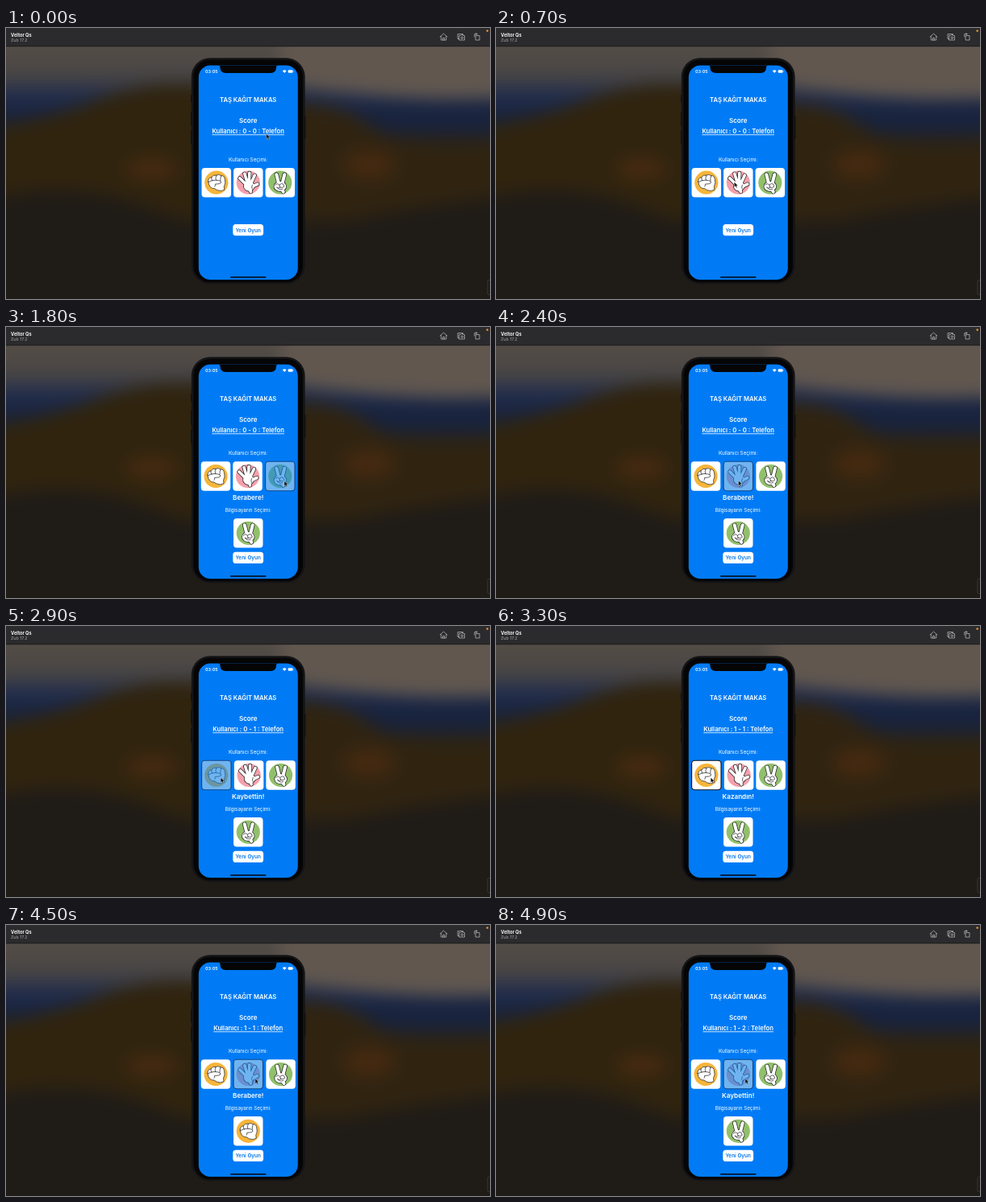
An HTML page that plays this animation: 600 by 337 pixels, repeating every 5 s.

```html
<!DOCTYPE html>
<html lang="tr">
<head>
<meta charset="utf-8">
<title>Taş Kağıt Makas</title>
<style>
html, body { margin: 0; width: 100%; height: 100%; overflow: hidden; background: #1c1a1a; }
svg { display: block; width: 100vw; height: 100vh; }
text { font-family: Inter, Roboto, sans-serif; }
.mid { text-anchor: middle; fill: #fff; }
.bold { font-weight: 600; }
.icon { fill: none; stroke: #b9b8ba; stroke-width: .75; stroke-linejoin: round; stroke-linecap: round; }
.ink { fill: none; stroke: #1d1d1f; stroke-width: .7; stroke-linecap: round; stroke-linejoin: round; }
</style>
</head>
<body>
<svg viewBox="0 0 600 337" preserveAspectRatio="none">
  <defs>
    <linearGradient id="sky" gradientUnits="userSpaceOnUse" x1="0" y1="0" x2="0" y2="337">
      <stop offset=".05" stop-color="#544d47"/>
      <stop offset=".17" stop-color="#4a4644"/>
      <stop offset=".26" stop-color="#1c2a4c"/>
      <stop offset=".34" stop-color="#1a2236"/>
      <stop offset=".45" stop-color="#2a2115"/>
      <stop offset=".7" stop-color="#221d17"/>
      <stop offset="1" stop-color="#1b1918"/>
    </linearGradient>
    <filter id="soft" filterUnits="userSpaceOnUse" x="-60" y="-60" width="720" height="460" color-interpolation-filters="sRGB">
      <feGaussianBlur stdDeviation="10"/>
    </filter>
    <clipPath id="glass"><rect x="238.8" y="46.5" width="123" height="266.6" rx="14.5"/></clipPath>

    <g id="rock">
      <circle r="14.6" fill="#f6b53a"/>
      <path class="ink" style="fill:#fff" d="M-10-1Q-10.500-6-6-6.500Q-4-10 0-9Q3-11 6-8.500Q10-9 10.500-4Q12 1 9.500 5L10 9Q6 11.500 1 9.500L-2 7.500Q-9 8-10-1Z"/>
      <path class="ink" d="M-6-6.500Q-6.500-4-5-2M0-9Q-1.500-6-.5-3M6-8.500Q4.500-5 5-2.500M-9-1Q-5-3.500-1-3Q3-3 5.500-1.500Q6.500 1 3.500 1.500L-1.500 2Q-1 4-2 5"/>
    </g>
    <g id="paper">
      <circle r="14.6" fill="#f4a0ac"/>
      <g fill="none" stroke="#1d1d1f" stroke-width="5" stroke-linecap="round">
        <path d="M0 5L-10.500-5.500M0 4L-4.500-11M1 4L1.500-12M2 4L8-9M3 6L11.500 2M2 6L3 11.500"/>
        <ellipse cx="1" cy="4.500" rx="5.500" ry="5" stroke-width="3.400"/>
        <g stroke="#fff" stroke-width="3.600">
          <path d="M0 5L-10.500-5.500M0 4L-4.500-11M1 4L1.500-12M2 4L8-9M3 6L11.500 2M2 6L3 11.500"/>
          <ellipse cx="1" cy="4.500" rx="5.500" ry="5" stroke-width="2" fill="#fff"/>
        </g>
      </g>
      <path class="ink" d="M5 3Q3.500 6 5 8"/>
    </g>
    <g id="scissors">
      <circle r="14.600" fill="#91c06b"/>
      <g fill="none" stroke="#1d1d1f" stroke-width="5.400" stroke-linecap="round">
        <path d="M-1 4L-4.500-10M2 4L5.500-10M1 6L4 11.500"/>
        <ellipse cx="0" cy="4.800" rx="6.500" ry="5" stroke-width="3.400"/>
        <g stroke="#fff" stroke-width="4">
          <path d="M-1 4L-4.500-10M2 4L5.500-10M1 6L4 11.500"/>
          <ellipse cx="0" cy="4.800" rx="6.500" ry="5" stroke-width="2" fill="#fff"/>
        </g>
      </g>
      <path class="ink" d="M-6 3Q-3 0-1 3L0 6Q-2 8-4 6M-1 3Q2 0 4 2L5 5Q3 7 0 6M-4 6Q-1 10 3 8"/>
    </g>
  </defs>

  <g filter="url(#soft)">
    <rect x="-60" y="-60" width="720" height="460" fill="url(#sky)"/>
    <path d="M340-20H660V84Q560 92 470 85T340 68Z" fill="#61574f"/>
    <path d="M440 98Q540 104 660 92V128H470Z" fill="#18233e"/>
    <path d="M-60 130Q40 118 110 90T250 72V240H-60Z" fill="#30240f"/>
    <path d="M350 95Q410 88 450 122T660 135V240H350Z" fill="#302411"/>
    <ellipse cx="180" cy="175" rx="32" ry="15" fill="#452910"/>
    <ellipse cx="450" cy="170" rx="32" ry="18" fill="#452910"/>
    <path d="M-60 225Q70 180 180 225T400 245T660 205V400H-60Z" fill="#1f1b17"/>
  </g>

  <rect width="600" height="23" fill="#2b2a2c"/>
  <rect y="22.500" width="600" height=".7" fill="#161516"/>
  <text x="6" y="10.600" font-size="5.700" font-weight="700" fill="#f1f0f2">Veltor Qs</text>
  <text x="6" y="17" font-size="5.300" fill="#a9a8ab">Zub 17.2</text>
  <g class="icon">
    <path d="M538 11L542.500 7L547 11M539.300 10.500V15H545.700V10.500M541.500 15V12.300H543.500V15"/>
    <path d="M561.500 13.500H560V7.500H566.500V9M562 9.500H563.700L564.500 8.700H566.500L567.200 9.500H568.500V15H562Z"/>
    <circle cx="565.300" cy="12.200" r="1.300"/>
    <path d="M582.500 9.500H587V15H582.500ZM580.800 11V7.500H584M582.700 6.200L584 7.500L582.700 8.800"/>
  </g>
  <circle cx="596.700" cy="3.500" r="1.300" fill="#f29a2e"/>
  <path d="M600 313.500H598.500Q597 313.500 597 315V330Q597 331.500 598.500 331.500H600" fill="none" stroke="#454244" stroke-width=".7"/>

  <g fill="#101012">
    <rect x="229" y="83" width="3" height="10" rx="1"/>
    <rect x="229" y="104" width="3" height="18" rx="1"/>
    <rect x="229" y="127" width="3" height="18" rx="1"/>
    <rect x="368.500" y="109" width="3" height="29" rx="1"/>
  </g>
  <rect x="229.800" y="37.300" width="140.800" height="281" rx="23" fill="#141416"/>
  <rect x="232.500" y="39.800" width="135.500" height="276.500" rx="20.500" fill="#050506"/>
  <g clip-path="url(#glass)">
    <rect x="238" y="46" width="125" height="268" fill="#007bf5"/>
    <path d="M263 46Q265.500 46.500 265.500 49Q265.500 56 272.500 56H328Q335 56 335 49Q335 46.500 337.500 46Z" fill="#050506"/>
    <text x="247" y="56" font-size="5.400" font-weight="600" fill="#fff">03:05</text>
    <path d="M342.800 53.300Q345.200 51.200 347.600 53.300L345.200 56Z" fill="#fff"/>
    <rect x="349.700" y="52.200" width="5.800" height="3.500" rx="1" fill="#fff"/>
    <rect x="355.800" y="53.300" width=".6" height="1.300" fill="#cfe5fd"/>
    <rect x="278" y="309" width="44.500" height="1.700" rx=".85" fill="#03152c"/>
  </g>

  <text class="mid bold" x="300.200" y="91.600" font-size="7.600">TAŞ KAĞIT MAKAS</text>
  <text class="mid bold" x="300.200" y="117.800" font-size="8">Score</text>
  <text class="mid bold" id="score" x="300.200" y="130.800" font-size="7.700"></text>
  <rect id="line" y="132.400" height=".8" fill="#fff"/>
  <text class="mid" id="pick" x="300.200" font-size="6.350">Kullanıcı Seçimi:</text>
  <g id="cards"></g>
  <g id="result">
    <text class="mid bold" id="verdict" x="300.200" y="215.400" font-size="8.100"></text>
    <text class="mid" x="300.200" y="230.300" font-size="6.250">Bilgisayarın Seçimi:</text>
    <rect x="282" y="238" width="36.500" height="36.500" rx="4" fill="#fff"/>
    <use id="reply" x="300.250" y="256.300"/>
  </g>
  <g id="again">
    <rect x="281.300" y="244" width="37.800" height="14.300" rx="3.600" fill="#fff"/>
    <text class="mid bold" x="300.200" y="253.500" font-size="6.450" style="fill:#0a78ea">Yeni Oyun</text>
  </g>
  <path id="arrow" d="M0 0V6.200L1.500 4.900L2.600 7.300L3.700 6.800L2.600 4.500H4.500Z" fill="#08080a" stroke="#fff" stroke-opacity=".75" stroke-width=".45"/>
</svg>
<script>
const LOOP = 5000, STEP = 100;
const SIZE = 36.5, GAP = 3, EDGE = 0.8, MID = 300.3;
const names = ["rock", "paper", "scissors"];
const $ = id => document.getElementById(id);

function make(parent, tag, attrs) {
  const el = document.createElementNS("http://www.w3.org/2000/svg", tag);
  return set(parent.appendChild(el), attrs);
}
function set(el, attrs) {
  for (const key in attrs) el.setAttribute(key, attrs[key]);
  return el;
}

const cards = names.map(name => {
  const g = make($("cards"), "g", {});
  const half = SIZE / 2;
  const box = { x: -half, y: -half, width: SIZE, height: SIZE, rx: 4 };
  make(g, "rect", { ...box, fill: "#fff" });
  make(g, "use", { href: "#" + name });
  const tint = make(g, "rect", { ...box, fill: "#1082e6", "fill-opacity": 0.6 });
  const edge = make(g, "rect", { ...box, fill: "none", "stroke-width": 1.2 });
  return { g, tint, edge };
});

// card, press time, answer time, release time, verdict, reply, score
const rounds = [
  [2, 1600, 1700, 2000, "Berabere!", "scissors", "0 - 0"],
  [1, 2300, 2500, 2700, "Kaybettin!", "scissors", "0 - 1"],
  [0, 2900, 3100, 3300, "Kazandın!", "scissors", "1 - 1"],
  [0, 3500, 3700, 3800, "Berabere!", "rock", "1 - 1"],
  [1, 4300, 4600, 5000, "Kaybettin!", "scissors", "1 - 2"]
];

// time, x, y
const route = [
  [0, 322.8, 131.7], [200, 322.8, 131.7], [500, 262, 190], [800, 307, 192],
  [1100, 378, 149], [1400, 355.7, 192], [1600, 345, 191.5], [2000, 345, 191.5],
  [2300, 300.6, 191], [2600, 300.6, 191], [2900, 266.2, 188.5], [3700, 266.2, 188.5],
  [4000, 301.8, 191.5], [4300, 309, 191], [5000, 309, 191]
];

function pointer(t) {
  let i = 1;
  while (route[i][0] < t) i++;
  const [t0, x0, y0] = route[i - 1], [t1, x1, y1] = route[i];
  const k = (t - t0) / (t1 - t0), e = k * k * (3 - 2 * k);
  return `translate(${x0 + (x1 - x0) * e} ${y0 + (y1 - y0) * e})`;
}

function draw(t) {
  const press = rounds.filter(r => t >= r[1]).pop();
  const answer = rounds.filter(r => t >= r[2]).pop();
  const chosen = press ? press[0] : -1;
  const held = press && t < press[3];

  $("score").textContent = `Kullanıcı : ${answer ? answer[6] : "0 - 0"} : Telefon`;
  const width = $("score").getComputedTextLength();
  set($("line"), { x: 300.2 - width / 2, width });
  set($("pick"), { y: answer ? 158.7 : 165.9 });
  set($("again"), { transform: `translate(0 ${answer ? 35.8 : 0})` });
  $("result").style.display = answer ? "" : "none";
  if (answer) {
    $("verdict").textContent = answer[4];
    set($("reply"), { href: "#" + answer[5] });
  }

  let x = MID - (SIZE * 3 + GAP * 2 + (press ? EDGE * 2 : 0)) / 2;
  cards.forEach((card, i) => {
    const on = i === chosen;
    const w = SIZE + (on ? EDGE * 2 : 0);
    set(card.g, { transform: `translate(${x + w / 2} ${answer ? 185.5 : 192.2})` });
    card.tint.style.display = on && held ? "" : "none";
    card.edge.style.display = on ? "" : "none";
    set(card.edge, { stroke: held ? "#0b478c" : "#10151d" });
    x += w + GAP;
  });
  set($("arrow"), { transform: pointer(t) });
}

const start = performance.now();
function tick() {
  const t = (performance.now() - start) % LOOP;
  draw(Math.floor(t / STEP) * STEP);
  requestAnimationFrame(tick);
}
tick();
</script>
</body>
</html>
```
